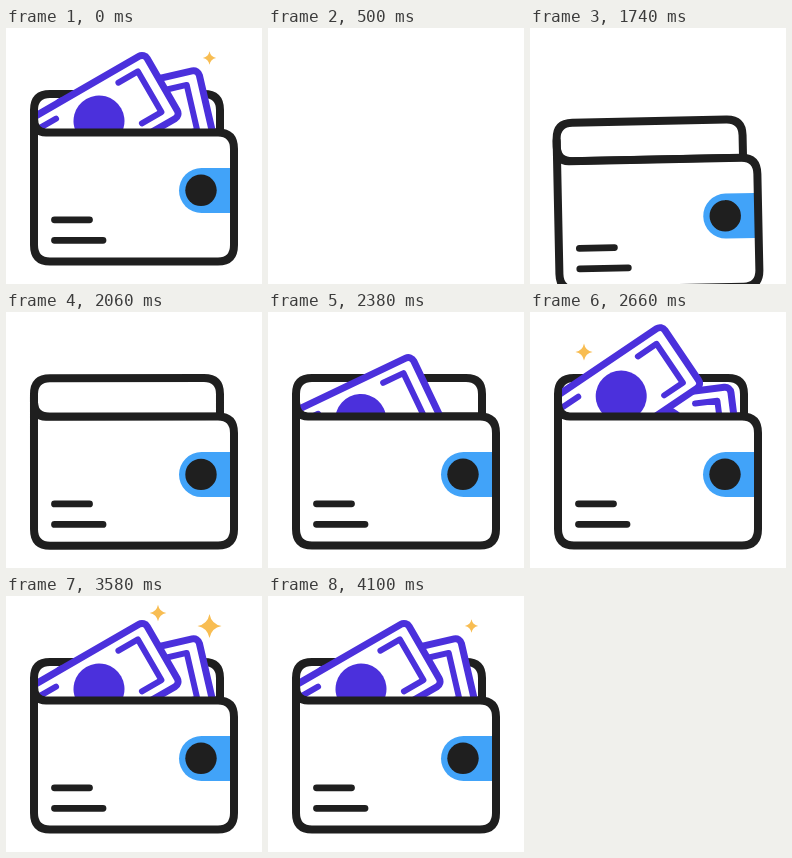
Write an HTML page with a canvas that moves like this. It is 256x256 px and loops after 4.6 s.

```html
<!DOCTYPE html>
<html lang="en">
<head>
<meta charset="utf-8">
<title>Wallet</title>
<style>
html, body { margin: 0; width: 100%; height: 100%; overflow: hidden; background: #fff; }
canvas { display: block; width: 100vw; height: 100vh; }
</style>
</head>
<body>
<canvas id="stage"></canvas>
<script>
const SIZE = 256, LOOP = 4600, HOLD = 500, END = 4100, STEP = 40;
const INK = '#1f1f1f', PURPLE = '#4b30dc', BLUE = '#41a3f9', GOLD = '#f8bd52';

const canvas = document.getElementById('stage');
const ctx = canvas.getContext('2d');
const ratio = Math.max(1, window.devicePixelRatio || 1);
canvas.width = canvas.height = SIZE * ratio;

const clamp = x => Math.min(1, Math.max(0, x));
const smooth = x => x * x * (3 - 2 * x);
const progress = (t, from, to) => smooth(clamp((t - from) / (to - from)));
const mix = (a, b, k) => a.map((v, i) => v + (b[i] - v) * k);
const rad = deg => deg * Math.PI / 180;

function stroke(color, width, path) {
  ctx.strokeStyle = color;
  ctx.lineWidth = width;
  ctx.stroke(path);
}

function fill(color, path) {
  ctx.fillStyle = color;
  ctx.fill(path);
}

function disc(color, x, y, r) {
  const path = new Path2D();
  path.arc(x, y, r, 0, Math.PI * 2);
  fill(color, path);
}

const back = new Path2D('M44 104.5H214V82Q214 66 198 66H44Q28 66 28 82V90Q28 104.5 44 104.5Z');
const front = new Path2D('M28 84V217Q28 233.5 44 233.5H212Q228 233.5 228 217V121Q228 104.5 212 104.5H40Q28 104.5 28 90Z');
const tab = new Path2D('M225 140H195.5A22.5 22.5 0 0 0 195.5 185H225Z');
const lines = new Path2D('M48.5 191.8H83.5M48.5 212.3H97');
const bracket = new Path2D('M36 -23.5H58.5V23.5H36M-36 -23.5H-58.5V23.5H-36');
const note = new Path2D();
note.roundRect(-73, -36, 146, 72, 6);

// Each pose is centre x, centre y, tilt in degrees.
const bills = [
  { start: 2380, poses: [[137, 166, 4], [129, 87, -15], [129, 93, -13]] },
  { start: 2060, poses: [[97, 166, -4], [91, 83, -34.5], [93, 93, -30]] }
];

const sparkles = [
  { x: 54, y: 40, start: 2450 },
  { x: 152, y: 17, start: 2840 },
  { x: 203.5, y: 30, start: 3310 }
];

function drawBill({ start, poses: [low, high, rest] }, t) {
  if (t <= start) return;
  const rise = progress(t, start, start + 500);
  const settle = progress(t, start + 500, start + 1000);
  const [x, y, tilt] = mix(mix(low, high, rise), rest, settle);
  ctx.save();
  ctx.translate(x, y);
  ctx.rotate(rad(tilt));
  fill('#fff', note);
  stroke(PURPLE, 7, note);
  stroke(PURPLE, 6, bracket);
  disc(PURPLE, 0, 0, 25.5);
  ctx.restore();
}

function drawBills(t) {
  ctx.save();
  ctx.beginPath();
  ctx.rect(32, 0, SIZE - 32, 102);
  ctx.clip();
  bills.forEach(bill => drawBill(bill, t));
  ctx.restore();
}

function drawWallet(t) {
  const left = clamp((2140 - t) / 720);
  ctx.save();
  ctx.translate(128, 150 + 194 * left ** 3.36);
  ctx.rotate(rad(-6 * left ** 2.75));
  ctx.translate(-128, -150);
  fill('#fff', back);
  stroke(INK, 8, back);
  drawBills(t);
  fill('#fff', new Path2D('M32 108H224V230H32Z'));
  fill(BLUE, tab);
  disc(INK, 195, 162.3, 15.7);
  stroke(INK, 8, front);
  stroke(INK, 6.8, lines);
  ctx.restore();
}

function drawSparkle({ x, y, start }, t) {
  const peak = start + 400;
  const r = 16 * (progress(t, start, peak) - progress(t, peak, peak + 700));
  if (r < 0.1) return;
  const c = r * 0.16;
  ctx.beginPath();
  ctx.moveTo(x, y - r);
  ctx.quadraticCurveTo(x + c, y - c, x + r, y);
  ctx.quadraticCurveTo(x + c, y + c, x, y + r);
  ctx.quadraticCurveTo(x - c, y + c, x - r, y);
  ctx.quadraticCurveTo(x - c, y - c, x, y - r);
  ctx.fillStyle = GOLD;
  ctx.fill();
}

function draw(t) {
  ctx.setTransform(ratio, 0, 0, ratio, 0, 0);
  ctx.lineCap = ctx.lineJoin = 'round';
  ctx.fillStyle = '#fff';
  ctx.fillRect(0, 0, SIZE, SIZE);
  if (t < 1420) return;
  drawWallet(t);
  sparkles.forEach(s => drawSparkle(s, t));
}

// The finished picture holds at both ends of the loop; between them time moves in even steps.
function sceneTime(ms) {
  const t = ms % LOOP;
  if (t < HOLD) return END;
  return Math.min(END, HOLD + STEP * Math.floor((t - HOLD) / STEP));
}

const origin = performance.now();
function tick() {
  draw(sceneTime(performance.now() - origin));
  requestAnimationFrame(tick);
}
tick();
</script>
</body>
</html>
```
